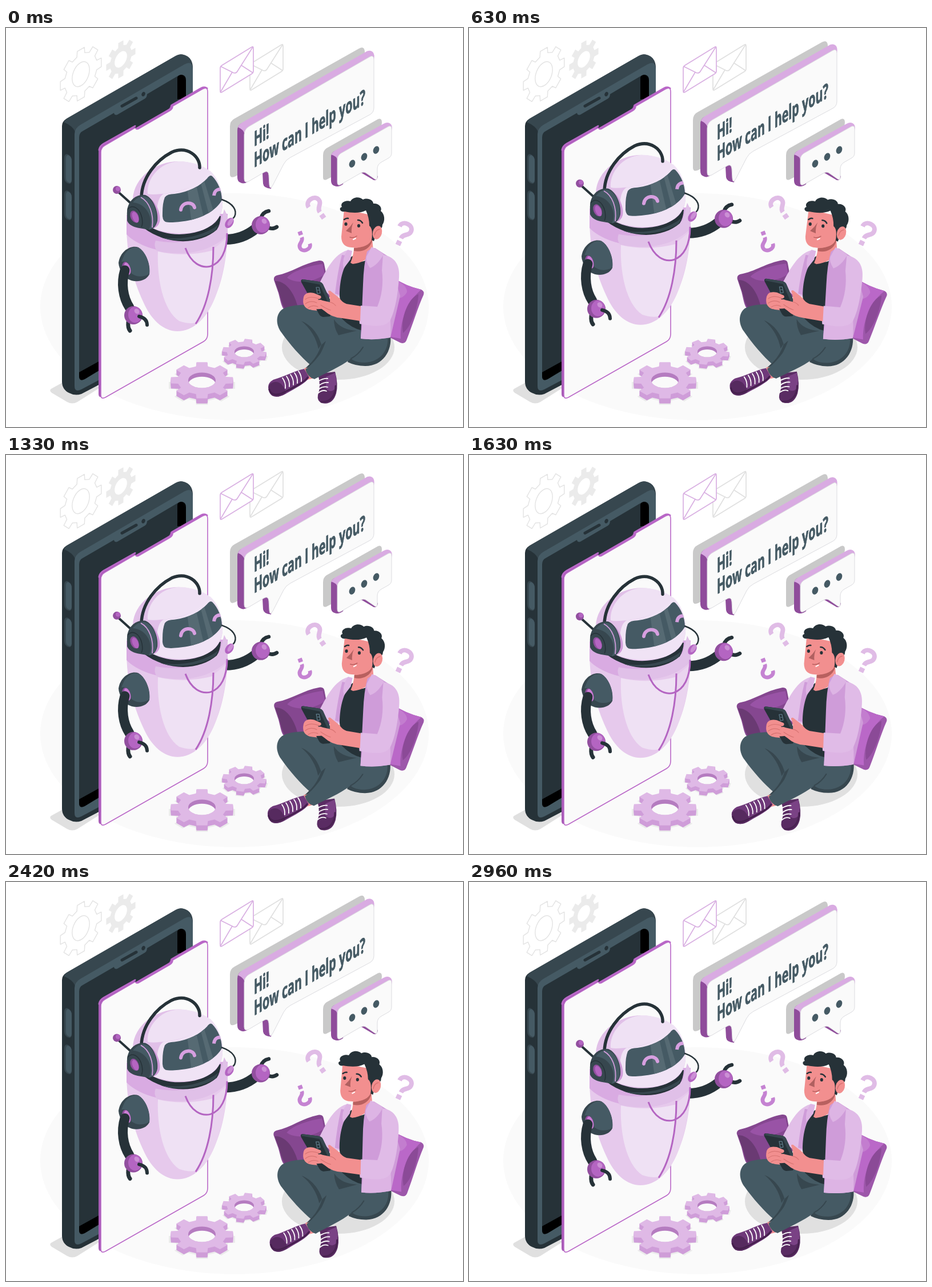
Animation of 800 by 700 pixels, one loop 3000 ms. Source, as an HTML page with a canvas:

```html
<!DOCTYPE html>
<html lang="en">
<head>
<meta charset="utf-8">
<title>Chat bot</title>
<style>
html, body { margin: 0; width: 100%; height: 100%; overflow: hidden; background: #fff; }
canvas { display: block; }
</style>
</head>
<body>
<canvas id="stage" width="800" height="700"></canvas>
<script>
const ctx = document.getElementById('stage').getContext('2d');
const LOOP = 3000, FRAMES = 72;
const INK = '#263238', SLATE = '#37474f', STEEL = '#455a64', PAPER = '#fafafa';
const PLUM = '#8f4c9b', VIOLET = '#ba68c8', LILAC = '#d9abe2', PINK = '#e0bce6', PALE = '#efe1f4';
const SKIN = '#f28f8f', BLUSH = '#b8605f';

const cache = {};
const path = d => cache[d] || (cache[d] = new Path2D(d));

function fill(color, d) {
  ctx.fillStyle = color;
  ctx.fill(path(d));
}
function line(color, width, d, cap = 'round') {
  ctx.strokeStyle = color;
  ctx.lineWidth = width;
  ctx.lineCap = cap;
  ctx.lineJoin = 'round';
  ctx.stroke(path(d));
}
function oval(color, x, y, rx, ry = rx, turn = 0) {
  ctx.fillStyle = color;
  ctx.beginPath();
  ctx.ellipse(x, y, rx, ry, turn, 0, 7);
  ctx.fill();
}
function group(draw, dx = 0, dy = 0) {
  ctx.save();
  ctx.translate(dx, dy);
  draw();
  ctx.restore();
}

// Gear outline seen through the plane [a, b, c, d]
function gear(x, y, R, root, [a, b, c, d], spin = 0, hole = 0) {
  const p = new Path2D(), n = 8, step = Math.PI * 2 / n;
  const add = (r, q) => {
    const u = r * Math.sin(q), v = -r * Math.cos(q);
    p.lineTo(x + a * u + c * v, y + b * u + d * v);
  };
  for (let i = 0; i < n; i++) {
    const q = i * step + spin;
    add(root, q - step * .31);
    add(R, q - step * .22);
    add(R, q + step * .22);
    add(root, q + step * .31);
  }
  p.closePath();
  if (hole) {
    for (let i = 0; i <= 40; i++) add(hole, -i / 40 * Math.PI * 2);
    p.closePath();
  }
  return p;
}

function floorGear(x, y, R, depth, spin) {
  const flat = [1, 0, 0, .585], k = R / 55;
  ctx.fillStyle = '#ebebeb';
  ctx.fill(gear(x, y + depth, R * 1.07, R * .86, flat, spin));
  for (let i = depth; i >= 0; i--) {
    ctx.fillStyle = i ? '#cf9dd9' : '#dfb9e6';
    ctx.fill(gear(x, y + i, R, R * .78, flat, spin));
  }
  ctx.save();
  ctx.beginPath();
  ctx.ellipse(x, y, 24 * k, 13.5 * k, 0, 0, 7);
  ctx.clip();
  ctx.fillStyle = '#b57cc0';
  ctx.fillRect(x - R, y - R, 2 * R, 2 * R);
  oval(PAPER, x, y + depth * .8, 24 * k, 13.5 * k);
  ctx.restore();
}

function envelope(color, x, y) {
  group(() => {
    const body = 'M3 33 L55 1 Q58 -1 58 3 L58 43 Q58 46 55 48 L3 80 Q0 82 0 78 L0 38 Q0 35 3 33Z';
    fill('#fff', body);
    line(color, 1.7, body);
    line(color, 1.7, 'M1 35 L23 46 Q28 48 31 42 L57 1 M1 79 L21 45 M57 46 L37 33');
  }, x, y);
}

function mark(color, x, y, turn, size) {
  ctx.save();
  ctx.translate(x, y);
  ctx.rotate(turn * Math.PI / 180);
  ctx.scale(size, size);
  line(color, 8, 'M-11 -7 C-11 -20 11 -20 11 -7 C11 2 0 1 0 11', 'butt');
  ctx.fillStyle = color;
  ctx.fillRect(-4.5, 16, 9, 8);
  ctx.restore();
}

function backdrop() {
  ctx.fillStyle = '#fff';
  ctx.fillRect(0, 0, 800, 700);
  oval(PAPER, 400, 489, 340, 199);
  const wall = [.866, -.5, 0, 1.05];
  const big = gear(131, 81, 42, 33, wall);
  ctx.fillStyle = '#fff';
  ctx.fill(big);
  ctx.strokeStyle = '#e3e3e3';
  ctx.lineWidth = 1.4;
  ctx.lineJoin = 'round';
  ctx.stroke(big);
  ctx.beginPath();
  ctx.ellipse(131, 81, 13.5, 23, .38, 0, 7);
  ctx.stroke();
  ctx.fillStyle = '#ebebeb';
  ctx.fill(gear(201, 55, 30, 22, wall, 0, 12.5), 'evenodd');
  envelope('#e0e0e0', 427, 28.5);
  envelope('#d9b0e2', 375, 32.5);
}

function phone() {
  fill('#e0e0e0', 'M79 633 L108 617 L166 630 L125 656 Q116 661 107 656 L80 640 Q75 636 79 633Z');
  fill(INK, 'M98 172 Q98 164 106 159 L297 49 Q305 44 314 48 Q327 54 327 70 L327 540 L132 642 Q121 646 110 640 Q98 634 98 620Z');
  fill(SLATE, 'M101 165 Q103 161 108 158 L297 49 Q305 44 314 48 Q323 51 326 62 L300 90 L121 182 Q117 172 101 165Z');
  fill(STEEL, 'M120 186 Q120 176 130 170 L312 64 Q327 56 327 72 L327 530 L132 634 Q120 640 120 628Z');
  fill(INK, 'M128 192 Q128 184 134 181 L189 149 Q190 154 195 152 L243 124 Q247 121 247 116 L301 84 Q315 78 315 92 L315 500 L140 614 Q128 620 128 610Z');
  fill('#000', 'M300 87 Q301 82 308 82 Q315 84 315 92 L315 125 L300 125Z');
  fill('#000', 'M128 604 L166 583 L166 599 L138 616 Q128 621 128 611Z');
  line(INK, 5, 'M203 137 L228 123');
  oval(INK, 240.5, 116, 3, 4, .4);
  for (const y of [0, 64]) group(() => {
    fill(SLATE, 'M102 228 Q102 221 107 221 Q115 224 115 233 L115 267 Q115 274 110 273 Q102 271 102 262Z');
    fill(STEEL, 'M105 229 Q105 223 109 223 Q115 226 115 233 L115 267 Q114 273 110 271 Q105 269 105 263Z');
  }, 0, y);
  const panel = 'M166 218 Q166 210 173 206 L226 175 Q228 179 232 177 L287 145 Q292 142 292 137 L344 107 Q353 102 353 112 L353 537 Q353 546 346 550 L174 648 Q166 652 166 644Z';
  group(() => fill('#a85bb6', panel), -4, -2);
  line(VIOLET, 3, 'M163 214 Q164 207 171 203 L226 172 M229 176 L288 142 Q290 140 291 135 L341 106 Q347 102 352 106');
  fill(PAPER, panel);
  line(VIOLET, 1.6, panel);
}

function bigBubble() {
  fill('#c9c9c9', 'M392 173 Q392 163 400 159 L618 36 Q627 31 628 41 L628 150 L400 261 Q392 264 392 256Z');
  fill(PLUM, 'M405 180 Q405 171 412 167 L480 190 L470 250 L464 282 Q451 281 450 273 L449 254 L424 269 Q417 275 410 271 Q405 269 405 262Z');
  fill(LILAC, 'M406 174 Q408 169 413 166 L628 43 Q636 37 642 42 Q646 46 644 56 L425 184 L417 184 Q415 178 406 174Z');
  const face = 'M417 187 Q417 178 425 173 L636 51 Q644 46 644 56 L644 140 Q644 148 637 152 L498 227 Q490 231 486 239 L467 276 Q462 285 461 275 L460 258 Q459 249 452 253 L425 269 Q417 273 417 265Z';
  fill(PAPER, face);
  line('#dcdce0', 1, face);
  ctx.fillStyle = ctx.strokeStyle = STEEL;
  ctx.lineWidth = .9;
  ctx.font = 'bold 36px "Open Sans", "Noto Sans", sans-serif';
  const say = (text, x, y) => {
    ctx.save();
    ctx.transform(.548, -.316, 0, 1, x, y);
    ctx.fillText(text, 0, 0);
    ctx.strokeText(text, 0, 0);
    ctx.restore();
  };
  say('Hi!', 434, 208);
  say('How can I help you?', 434, 245);
}

function smallBubble() {
  fill('#c9c9c9', 'M555 223 Q555 215 561 211 L651 160 Q658 157 658 166 L650 220 L561 266 Q555 268 555 262Z');
  fill(PLUM, 'M569 226 Q569 219 575 216 L600 230 L590 274 Q582 280 575 277 Q569 275 569 268Z');
  fill(PLUM, 'M622 254 L644 267 Q650 268 651 260 L634 246Z');
  fill(LILAC, 'M569 222 Q571 218 576 215 L661 168 Q668 164 673 168 Q677 171 675 180 L590 230 L580 231 Q579 225 569 222Z');
  const face = 'M580 231 Q580 224 586 220 L669 173 Q675 170 675 177 L675 219 Q675 225 670 228 L656 236 Q650 240 650 247 L650 261 Q650 269 644 264 L631 255 Q626 251 620 255 L587 274 Q580 278 580 271Z';
  fill(PAPER, face);
  line('#dcdce0', 1, face);
  for (let i = 0; i < 3; i++) oval(STEEL, 606 + 21 * i, 238 - 12 * i, 5, 7, .4);
}

function ball(x, y) {
  oval('#924f9f', x, y, 16);
  oval('#b465c2', x + 3, y - 1, 12, 14);
  oval('#cb8fd5', x + 6, y - 7, 4, 5, -.7);
}

function robotBody() {
  line(INK, 18, 'M384 371 Q414 371 437 352');
  line(INK, 6.5, 'M446 334 Q449 323 460 321 M458 350 Q467 354 474 349');
  ball(446, 346);
  fill('#e6c9ec', 'M211 345 C211 400 222 440 240 480 C255 515 278 532 300 532 C328 532 350 510 365 475 C380 440 388 400 388 345Z');
  fill('#ead4ef', 'M363 388 L387 368 C386 405 377 445 365 475 C357 495 347 510 333 519 C352 485 363 440 363 388Z');
  fill(PALE, 'M266 392 C264 440 275 495 303 514 Q320 520 333 517 C352 487 363 440 363 390 C330 399 295 399 266 392Z');
  fill(LILAC, 'M211 328 L211 362 C240 394 340 414 388 362 L388 326Z');
  fill('#e0c0e8', 'M262 373 C305 382 355 370 374 348 L382 318 L388 330 L388 362 C362 392 312 402 264 391 Q258 382 262 373Z');
  line('#b465c2', 3, 'M314 386 C324 413 342 422 358 418 C376 412 387 392 387 360 M363 384 C363 435 354 486 332 519', 'butt');
}

function robotHead() {
  fill(INK, 'M238 338 L376 330 Q375 345 369 354 C340 379 285 384 240 350Z');
  fill(SLATE, 'M270 367 C305 373 345 366 372 345 L367 355 C345 370 300 378 270 367Z');
  fill('#e1c0e8', 'M222 300 C224 262 262 234 302 234 C345 235 376 262 379 300 C381 333 365 347 340 356 C305 367 275 362 248 347 C230 335 221 318 222 300Z');
  fill(PALE, 'M248 291 C246 265 268 236 302 234 C326 234 346 242 357 251 C340 275 305 290 272 291 Q255 293 248 291Z');
  fill('#f0e3f5', 'M263 338 C264 312 266 296 276 291 C310 289 340 273 357 250 C372 264 379 285 379 302 C381 328 366 345 345 354 C315 364 285 362 257 351Z');
  const visor = 'M278 297 Q282 291 295 291 C320 288 340 277 352 264 Q357 257 361 260 C371 270 378 286 378 302 C368 320 345 333 318 338 C300 341 286 342 279 340 Q273 337 274 324 Q274 307 278 297Z';
  fill(STEEL, visor);
  ctx.save();
  ctx.clip(path(visor));
  fill('#566a73', 'M317 280 L333 276 L347 336 L325 342Z M340 268 L346 265 L364 324 L356 330Z');
  line('#d79fe0', 6, 'M364 294 C365 283 374 281 380 285', 'butt');
  ctx.restore();
  line('#d79fe0', 6, 'M306 319 C308 304 328 304 330 315');
  line(INK, 2.5, 'M378 301 C398 308 405 320 400 331 L394 338');
  oval('#b465c2', 391, 342, 6.5, 10, .6);
  oval('#cb8fd5', 393, 340, 3.5, 8, .6);
  line(INK, 5.5, 'M237 297 C238 262 263 232 290 218 C317 206 340 225 339 245');

  // Ear cup and antenna
  fill('#cf9bd9', 'M240 295 C258 294 272 322 269 340 Q266 350 256 352Z');
  line(INK, 4, 'M198 289 L219 308');
  oval('#924f9f', 194, 284, 7);
  oval('#b465c2', 196, 282, 4);
  fill(SLATE, 'M212 320 C215 300 230 291 244 293 C258 298 267 322 265 338 Q262 352 251 354 C236 351 217 351 212 338Z');
  fill(STEEL, 'M222 306 C235 290 250 292 259 311 C268 335 264 350 250 354 C260 338 248 308 222 306Z');
  fill(SLATE, 'M212 322 C214 310 222 306 230 309 C241 317 246 336 239 350 C222 350 210 340 212 322Z');
  line('#cf9bd9', 1.8, 'M236 297 C251 305 259 326 256 350', 'butt');
  line(INK, 1.5, 'M213 318 C222 308 234 316 238 333 Q240 344 237 349', 'butt');
  oval('#924f9f', 225, 331, 7, 11, -.4);
  oval('#b465c2', 226.5, 332, 5, 10, -.4);
}

function robotArm() {
  fill(SLATE, 'M197 412 C200 390 220 380 232 385 C246 395 253 415 251 432 C244 446 224 447 213 440 C205 434 198 424 197 412Z');
  fill(STEEL, 'M207 398 C216 384 228 382 236 388 C247 398 252 416 251 431 C240 439 226 436 219 430 C218 416 213 408 202 410Z');
  oval('#924f9f', 211, 422, 7, 12, -.3);
  oval('#cb7fd6', 212.5, 422, 5, 11, -.3);
  line(INK, 17, 'M208 425 C201 448 205 473 216 490');
  line(INK, 7, 'M214 516 Q213 526 217 531');
  ball(223, 504);
  line(INK, 6, 'M233 506 Q247 509 247 521');
}

function robot() {
  robotBody();
  robotHead();
  robotArm();
}

function pillows() {
  fill('#854790', 'M469 442 Q468 436 474 434 C500 429 520 413 548 408 Q556 407 557 414 L568 470 L545 502 L488 495 C482 490 481 480 477 465Z');
  fill('#9953a6', 'M492 438 C500 428 525 418 554 414 L558 432 C540 446 508 450 492 438Z');
  fill('#6a3a73', 'M471 444 C488 443 505 462 512 494 L490 495 Q484 488 480 470Z');
  fill('#9d57aa', 'M676 437 Q700 453 727 459 Q733 462 731 468 C721 490 712 520 701 548 Q698 555 690 552 L668 541Z');
  fill(VIOLET, 'M676 437 Q700 453 727 459 C707 475 689 508 691 545 L668 541Z');
  fill('#8b4a97', 'M722 467 C705 473 690 508 695 535 C710 523 721 491 722 467Z');
  fill('#c37dcf', 'M684 443 Q702 452 702 463 Q696 475 682 475Z');
}

function legs() {
  fill('#5a2c63', 'M546 607 L576 603 Q582 625 578 641 C574 655 565 661 553 658 Q544 654 546 644 Q552 628 546 607Z');
  fill('#7a4285', 'M560 612 L576 605 Q580 620 577 632 Q568 642 560 632Z');
  line('#4a2352', 3, 'M577 628 C577 646 567 657 552 656');
  line('#fff', 1.8, 'M546 620 Q556 614 563 615 M548 627 Q556 621 564 622 M548 633 Q556 628 563 630 M547 640 Q554 634 561 637');
  fill(SKIN, 'M522 597 L533 593 L540 614 L528 617Z');
  fill('#6f397a', 'M459 630 Q459 622 468 617 C487 612 506 601 522 598 L531 613 C524 624 506 632 491 641 Q476 650 466 645 Q459 640 459 630Z');
  fill('#562a5f', 'M460 627 Q470 616 481 624 Q489 632 490 641 Q476 650 466 645 Q459 640 460 627Z');
  line('#46204e', 3, 'M461 634 C464 645 475 645 487 639 C505 630 523 621 528 613');
  for (let i = 0; i < 5; i++) group(() => line('#fff', 1.8, 'M0 0 Q6 8 5 18'), 484 + i * 7, 614 - i * 3);

  fill(STEEL, 'M575 492 C545 485 502 482 483 494 C471 504 473 522 482 534 C497 555 516 577 535 593 L570 588 L625 540 L625 510Z');
  fill(SLATE, 'M517 514 C535 521 547 538 552 555 L547 563 C543 544 533 527 517 514Z');
  fill(SLATE, 'M574 511 C582 524 596 530 614 531 L582 539 Q574 526 574 511Z');
  fill(SLATE, 'M560 549 L552 556 Q546 574 535 586 L524 597 L534 594 Q550 578 560 549Z');
  fill(SLATE, 'M673 540 C676 566 660 593 629 593 Q612 593 598 586 L604 560Z');
  fill(STEEL, 'M668 541 C671 565 655 586 628 587 C612 587 606 582 604 580 C585 595 560 605 540 616 Q528 613 524 599 C545 585 556 558 575 545 C595 533 635 532 668 541Z');
  line(SLATE, 2, 'M604 580 Q617 573 625 560');
}

function torso() {
  fill('#e2bfe8', 'M597 390 C575 397 562 421 547 451 L568 470 L588 472 L605 404Z');
  fill('#cf9cd9', 'M588 398 L600 400 L588 470 L576 466 Q580 430 588 398Z');
  fill(INK, 'M606 400 Q618 416 632 406 L645 404 L626 480 L624 531 Q605 527 588 510 L584 470 C584 440 591 414 606 400Z');
  fill(SKIN, 'M610 378 L641 368 L643 392 Q632 411 607 414 L603 412 Q609 398 610 378Z');
  fill('#cf9cd9', 'M632 392 Q640 385 646 386 L671 402 L690 470 L673 543 Q645 548 621 545 L625 450 Q626 415 632 392Z');
  fill('#ddb4e4', 'M630 500 L672 500 Q674 520 673 543 Q645 548 621 545 Q622 520 630 500Z');
  fill('#ddb4e4', 'M640 384 Q655 391 661 397 C654 410 646 418 637 421 Q629 409 631 401Z');
  fill('#ddb4e4', 'M598 389 L606 391 L603 406 L591 422 Q587 405 598 389Z');
  fill('#e0bbe7', 'M660 398 C680 401 690 415 688 438 C686 468 681 496 673 512 C666 525 645 524 619 519 Q617 503 621 487 L650 489 C658 470 661 448 658 425Z');
}

function hands() {
  fill(SKIN, 'M522 478 Q522 467 536 466 L560 478 L555 497 L536 495 Q520 492 522 478Z');
  fill(INK, 'M517 446 Q515 441 520 441 L548 445 Q553 446 555 450 L573 489 L567 506 L555 507 Q550 506 548 502Z');
  fill(SLATE, 'M517 444 L520 441 L548 445 Q553 446 555 450 L572 488 L567 489 L549 450Z');
  line('#607d8b', 1.2, 'M543 455 L548 455 L550 465 L545 466Z M545 460 L549 460', 'butt');
  fill(SKIN, 'M564 462 Q566 459 570 463 L584 474 Q588 481 596 484 L621 488 L620 514 L588 509 Q570 508 557 496 L540 484 Q545 474 554 478 L567 481 Q568 474 564 462Z');
  fill(SKIN, 'M521 472 Q524 462 539 465 L551 470 Q554 475 546 476 L557 486 Q557 493 550 493 L531 494 Q517 489 521 472Z');
  line('#d87473', 1.2, 'M524 476 Q533 469 548 475 M524 484 Q533 477 544 482 M529 491 Q537 485 546 489 M551 486 Q561 493 568 495 M567 481 Q573 482 577 487');
}

function head() {
  fill(BLUSH, 'M609 386 Q628 386 640 370 L641 374 C636 389 622 394 609 391Z');
  fill(SKIN, 'M592 318 L587 366 Q587 384 605 385 C622 387 637 381 640 371 L648 330Z');
  fill(INK, 'M593 322 C586 324 581 316 588 314 C584 307 594 301 603 304 C607 296 619 295 625 301 C633 297 643 302 643 308 C653 307 659 315 656 321 C663 326 664 338 659 345 Q659 354 650 355 L644 374 L640 372 Q643 352 636 347 Q636 333 630 320 C618 326 603 324 593 322Z');
  oval(SKIN, 650, 359, 8, 12, .25);
  line('#d87473', 1.5, 'M645 363 Q647 354 654 353');
  line(INK, 2.5, 'M592 336 Q596 333 599 334 M616 337 Q621 337 624 342');
  oval(INK, 595, 344, 2.6, 3);
  oval(INK, 617.5, 347, 2.6, 3);
  fill('#b06060', 'M608 341 Q604 350 605 360 L595 356 Q602 350 608 341Z');
  line(BLUSH, 1.5, 'M602 367 Q608 369 614 365');
  line('#fff', 2, 'M608 371 L612 369');
}

function man() {
  pillows();
  legs();
  torso();
  hands();
  head();
}

function draw(t) {
  // Steps of 24 per second
  const p = Math.floor((t + 2) * FRAMES / LOOP) / FRAMES;
  const bob = -6 * (1 - Math.cos(p * 4 * Math.PI));
  const sway = Math.sin(p * 2 * Math.PI) * Math.PI / 180;

  backdrop();
  phone();
  floorGear(343, 618, 55, 9, 0);
  floorGear(417, 568, 39, 7, .2);
  group(bigBubble, 0, bob);
  smallBubble();
  group(robot, 0, bob);
  oval('#e0e0e0', 581.5, 560, 98.5, 57);
  mark(PINK, 543, 314, -35, 1);
  mark('#c583d2', 521, 376, 160, .85);
  mark(PINK, 696, 359, 25, 1);
  ctx.save();
  ctx.translate(595, 478);
  ctx.rotate(sway);
  ctx.translate(-595, -478);
  man();
  ctx.restore();
}

function tick() {
  draw(performance.now() % LOOP);
  requestAnimationFrame(tick);
}
tick();
</script>
</body>
</html>
```
